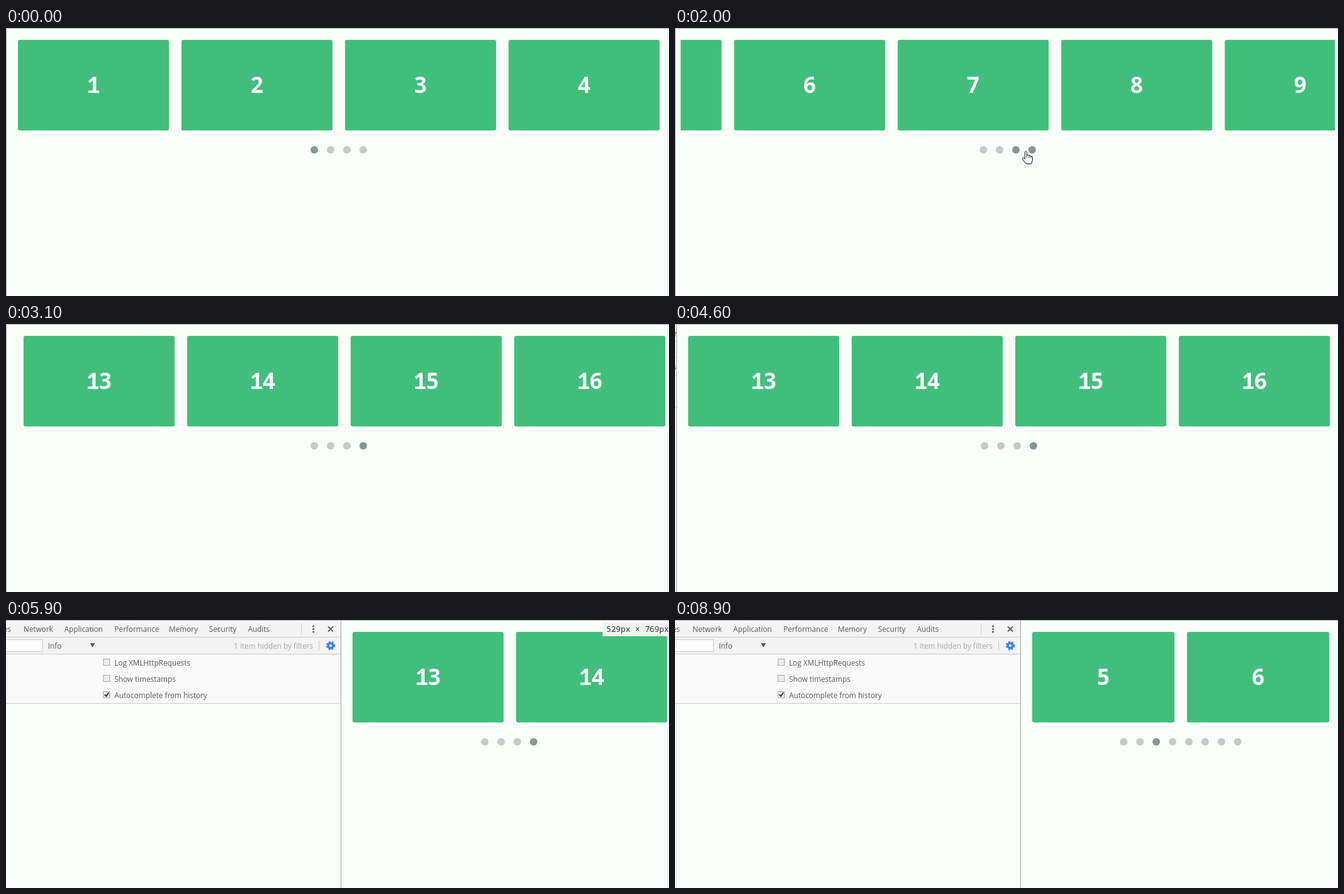
Animation of 1058 by 429 pixels, one loop 9500 ms. Source, as an HTML page with a canvas:

```html
<!DOCTYPE html>
<html lang="en">
<head>
<meta charset="utf-8">
<title>Carousel demo</title>
<style>
html, body { margin: 0; width: 100%; height: 100%; overflow: hidden; background: #f9fefa; }
canvas { display: block; }
</style>
</head>
<body>
<canvas id="stage" width="1058" height="429"></canvas>
<script>
const WIDTH = 1058, HEIGHT = 429, LOOP = 9500, TICK = 100;
const ctx = document.getElementById('stage').getContext('2d');
const PAGE = '#f9fefa', LINE = '#a3a3a3', RULE = '#cccccc', INK = '#5a5a5a';
const UI_FONT = '11.8px "Open Sans", sans-serif';

// Width of the tools panel over time: [ms, px]
const PANEL = [[4500, 0], [4600, 2], [4700, 258], [4900, 330], [5500, 470],
  [5900, 534], [6200, 534], [6300, 543], [6400, 551]];

// Clicks on the pager: [ms, first visible card]
const CLICKS = [[1265, 4], [1885, 8], [2440, 12], [7750, 4]];
const SLIDE = 750;

// Pointer: [ms, x, y, shape]
const POINTER = [
  [100, 987, 135, arrow], [200, 833, 211, arrow], [300, 587, 252, arrow],
  [400, 494, 252, arrow], [500, 498, 222, arrow], [600, 530, 180, arrow],
  [800, 524, 193, hand], [1500, 529, 194, hand], [1700, 546, 194, hand],
  [1900, 550, 195, hand], [2000, 560, 196, hand], [2300, 565, 196, hand],
  [2500, 536, 238, arrow], [2600, 481, 277, arrow], [2700],
  [6900, 735, 263, arrow], [7000, 733, 228, arrow], [7100, 750, 213, arrow],
  [7200, 760, 209, arrow], [7300, 766, 206, arrow], [7400, 768, 200, hand],
  [8500, 840, 180, arrow], [8600, 950, 146, arrow], [8700, 1034, 116, arrow],
  [8800, 1046, 115, arrow], [8900]
];

const ARROW = new Path2D('M.5 .5V16.5L4 13L6.5 18.5L9 17.5L6.7 12H11.5Z');
const HAND = new Path2D('M-1.5 11V2Q0 -.8 1.5 2V7.5Q4 6 5 8.5Q7 7 8 9.5' +
  'Q10.5 8.5 10.5 11V15L8.5 21.5H0L-5 14.5Q-6 11 -3 12L-1.5 13.5Z');

function lerpKeys(keys, t) {
  const next = keys.findIndex(key => key[0] > t);
  if (next < 0) return keys[keys.length - 1][1];
  if (next === 0) return keys[0][1];
  const [t0, a] = keys[next - 1], [t1, b] = keys[next];
  return a + (b - a) * (t - t0) / (t1 - t0);
}

// CSS "ease": cubic-bezier(.25, .1, .25, 1)
function ease(x) {
  if (x >= 1) return 1;
  const bezier = (s, p1, p2) => 3 * s * (1 - s) ** 2 * p1 + 3 * s * s * (1 - s) * p2 + s ** 3;
  let low = 0, high = 1;
  for (let i = 0; i < 24; i++) {
    const mid = (low + high) / 2;
    if (bezier(mid, .25, .25) < x) low = mid; else high = mid;
  }
  return bezier(low, .1, 1);
}

// Each click starts from wherever the previous slide has got to.
function carousel(t) {
  let from = 0, target = 0, start = 0;
  const positionAt = time => from + (target - from) * ease((time - start) / SLIDE);
  for (const [time, card] of CLICKS) {
    if (time > t) break;
    from = positionAt(time);
    target = card;
    start = time;
  }
  return { position: positionAt(t), target };
}

function rect(x, y, w, h, color) {
  ctx.fillStyle = color;
  ctx.fillRect(x, y, w, h);
}

function disc(x, y, r, color) {
  ctx.fillStyle = color;
  ctx.beginPath();
  ctx.arc(x, y, r, 0, 2 * Math.PI);
  ctx.fill();
}

function label(text, x, y, color = INK, align = 'left', font = UI_FONT) {
  ctx.font = font;
  ctx.textAlign = align;
  ctx.fillStyle = color;
  ctx.fillText(text, x, y);
}

function stroke(path, color, width) {
  ctx.strokeStyle = color;
  ctx.lineWidth = width;
  ctx.stroke(new Path2D(path));
}

function cardNumber(text, center) {
  const font = '700 35px "Open Sans", sans-serif', advance = 20;
  let x = center - text.length * advance / 2;
  for (const digit of text) {
    label(digit, x + advance / 2, 104, PAGE, 'center', font);
    if (digit === '1') rect(x + 2, 100, 17, 4, PAGE);
    x += advance;
  }
}

function drawCards(position, panel, step, right) {
  ctx.save();
  ctx.beginPath();
  ctx.rect(9 + panel, 0, right - 9 - panel, HEIGHT);
  ctx.clip();
  for (let i = 0; i < 16; i++) {
    const x = 19 + panel + (i - position) * step;
    if (x > WIDTH || x + step < 0) continue;
    ctx.fillStyle = '#41bf7a';
    ctx.beginPath();
    ctx.roundRect(x, 19, step - 20, 145, 3);
    ctx.fill();
    cardNumber(String(i + 1), x + (step - 20) / 2);
  }
  ctx.restore();
}

function drawDots(count, active, center, pointer) {
  for (let i = 0; i < count; i++) {
    const x = center + (i - (count - 1) / 2) * 26;
    const hovered = pointer && pointer[3] === hand && Math.abs(pointer[1] - x) < 13;
    disc(x, 195, 6, i === active || hovered ? '#869791' : '#c3cbc7');
  }
}

function checkbox(x, y, text, checked) {
  rect(x, y, 11, 11, '#a8a8a8');
  rect(x + 1, y + 1, 9, 9, '#ececec');
  if (checked) stroke(`M${x + 2.5} ${y + 5.5}l2.5 2.5l4 -6`, '#333', 1.8);
  label(text, x + 18, y + 11);
}

function gear(x, y) {
  ctx.strokeStyle = '#3b7ded';
  ctx.lineWidth = 3.4;
  ctx.beginPath();
  ctx.arc(x, y, 3.9, 0, 2 * Math.PI);
  ctx.stroke();
  ctx.lineWidth = 2;
  ctx.setLineDash([2.6, 2.5]);
  ctx.beginPath();
  ctx.arc(x, y, 6.2, 0, 2 * Math.PI);
  ctx.stroke();
  ctx.setLineDash([]);
}

function drawPanel(width) {
  const grown = width - 534;
  ctx.save();
  ctx.beginPath();
  ctx.rect(0, 0, width, HEIGHT);
  ctx.clip();
  rect(0, 0, width, HEIGHT, PAGE);
  rect(0, 0, width, 54, '#f4f4f4');
  rect(0, 55, width, 78, '#f9f9f9');
  for (const y of [27, 54, 133]) rect(0, y, width, 1, RULE);

  label('Sources', 8, 19, INK, 'right');
  const tabs = [['Network', 28], ['Application', 93], ['Performance', 173],
    ['Memory', 260], ['Security', 324], ['Audits', 386]];
  for (const [name, x] of tabs) if (x + 40 < width - 63) label(name, x, 19);
  rect(width - 63, 6, 1, 16, RULE);
  for (const y of [10, 14.5, 19]) disc(width - 43.5, y, 1.5, INK);
  stroke(`M${width - 20} 10.5l8 8m0 -8l-8 8`, INK, 1.8);

  const shift = grown * 3 / 17;
  rect(-2, 31, 61 + shift, 20, RULE);
  rect(-2, 32, 60 + shift, 18, '#fcfdfc');
  label('Info', 67 + shift, 46);
  ctx.fillStyle = INK;
  ctx.fill(new Path2D(`M${134 + shift} 37h8l-4 7z`));
  label('1 item hidden by filters', width - 44, 46, '#a6a6a6', 'right');
  rect(width - 35, 33, 1, 16, RULE);
  gear(width - 16, 41);

  const boxX = Math.round(155 + grown * .53);
  checkbox(boxX, 62, 'Log XMLHttpRequests');
  checkbox(boxX, 88, 'Show timestamps');
  checkbox(boxX, 114, 'Autocomplete from history', true);
  ctx.restore();
}

function drawTooltip(panel) {
  rect(952, 4, 106, 22, '#f1f3f1');
  label(`${Math.round(1063 - panel)}px × 769px`, 958, 19, '#333', 'left',
    '12.8px "Noto Sans Mono", monospace');
}

function drawShape(path, x, y) {
  ctx.save();
  ctx.translate(x, y);
  ctx.lineJoin = 'round';
  ctx.lineWidth = 1;
  ctx.fillStyle = '#fff';
  ctx.strokeStyle = '#10101c';
  ctx.fill(path);
  ctx.stroke(path);
  ctx.restore();
}

function arrow(x, y) { drawShape(ARROW, x, y); }

function hand(x, y) {
  drawShape(HAND, x, y);
  stroke(`M${x + 1.5} ${y + 7}v4m3.5 -3v3.5m3 -2v2.5`, '#10101c', 1);
}

function draw(t) {
  const panel = Math.round(lerpKeys(PANEL, t));
  const narrow = t >= 6100;
  const step = !narrow ? 261 : t < 6600 ? 255 : 247;
  const right = 1053 + (narrow ? 0 : Math.min(panel, 10));
  const perPage = narrow ? 2 : 4;
  const { position, target } = carousel(t);
  const pointer = POINTER.filter(key => key[0] <= t).pop();

  rect(0, 0, WIDTH, HEIGHT, PAGE);
  drawCards(position, panel, step, right);
  drawDots(16 / perPage, target / perPage, Math.round((9 + panel + right) / 2), pointer);
  if (panel) drawPanel(panel);
  rect(0, 0, WIDTH, 1, '#b4b4b4');
  rect(panel, 0, 1, HEIGHT, LINE);
  if (t >= 4700 && t < 7200) drawTooltip(panel);
  if (pointer && pointer[3]) pointer[3](pointer[1], pointer[2]);
}

const began = performance.now();
function frame() {
  const t = (performance.now() - began) % LOOP;
  draw(Math.floor(t / TICK) * TICK);
  requestAnimationFrame(frame);
}
frame();
</script>
</body>
</html>
```
